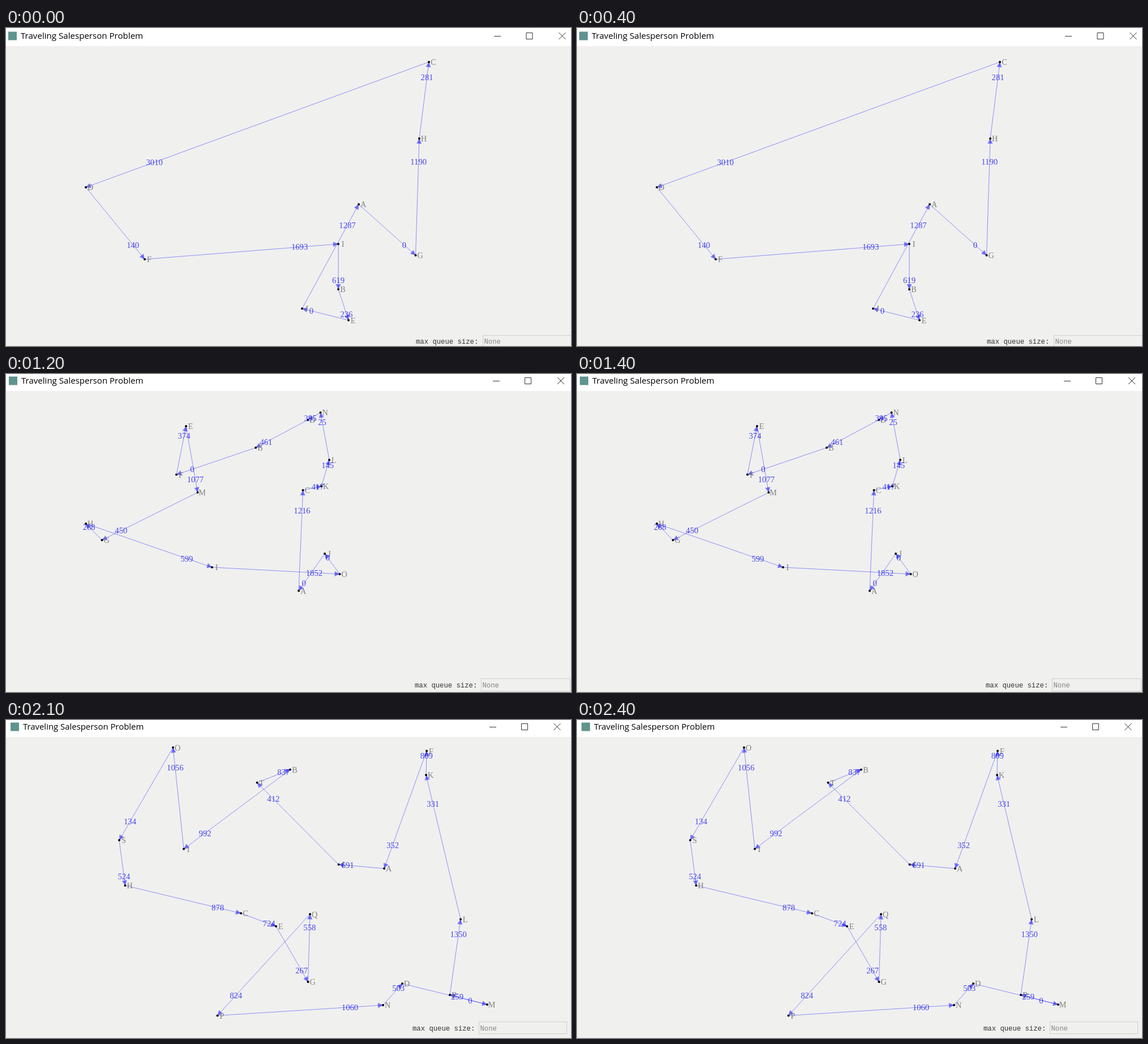
Animation of 998 by 561 pixels, one loop 3.1 s. Source, as an HTML page:

```html
<!DOCTYPE html>
<html lang="en">
<head>
<meta charset="utf-8">
<title>Traveling Salesperson Problem</title>
<style>
  html, body { margin: 0; width: 100%; height: 100%; overflow: hidden; background: #f0f0ef; }
  #stage { position: relative; width: 998px; height: 561px; overflow: hidden; }
  #strip { animation: scenes 3100ms step-end infinite; }
  svg { display: block; }
  .title { font: 15px "Open Sans", "Noto Sans", sans-serif; fill: #000; }
  .mono { font: 12.25px "Liberation Mono", monospace; }
  .cost { font: 14.7px "Liberation Serif", serif; fill: #00e; fill-opacity: .7; text-anchor: middle; }
  .name { font: 14.2px "Liberation Serif", serif; fill: #808080; text-anchor: middle; }
  .edge { stroke: #00f; stroke-opacity: .41; stroke-width: 1; }
  .head { fill: #00f; fill-opacity: .5; }
  .ctrl { fill: none; stroke: #333; stroke-width: 1; }
  /* cuts at 1000 ms and 2100 ms */
  @keyframes scenes {
    0% { transform: translateY(0); }
    32.258% { transform: translateY(-561px); }
    67.742%, 100% { transform: translateY(-1122px); }
  }
</style>
</head>
<body>
<div id="stage"><div id="strip"></div></div>
<script>
// Each stop: name, x, y, cost of the edge that arrives there.
const scenes = [
  {
    bar: 32, mid: 14, icon: 4, title: [26, 15.1], buttons: [868, 924.5, 982.5],
    label: [724, 557], box: [842.5, 542.5, 160, 23],
    tour: `C 747 60 281, D 141 281 3010, F 245 408 140, I 587 381 1693, B 587 461 619,
      E 605 515.5 236, J 523 495 0, A 623 311 1287, G 723.5 401 0, H 730 195 1190`
  },
  {
    bar: 30, mid: 12, icon: 5, title: [27, 15.05], buttons: [866, 922, 980],
    label: [722, 553], box: [839.5, 537.5, 157, 22],
    tour: `E 318 92 374, M 338.5 209 1077, G 169.5 293 450, H 141 264 268, I 364 341 599,
      O 589.5 353 1852, J 563 317 0, A 517 382.5 0, C 524.5 205 1216, K 557 198 417,
      L 571 151.5 145, N 555.5 68 25, D 533 81 395, B 441 130 461, F 301 177.5 0`
  },
  {
    bar: 30, mid: 12, icon: 8, title: [30, 14.9], buttons: [860, 916, 973.5],
    label: [718, 548], box: [835.5, 532.5, 155, 21],
    tour: `O 295 48.5 1056, S 200 212 134, H 210.5 292 524, C 415 341 878, E 477 364 724,
      G 533.5 462 267, Q 537 342.5 558, P 373.5 521.5 824, N 666 503 1060, D 700 465 503,
      M 850 502 0, R 784 485 259, L 803 351.5 1350, K 742 97 331, F 743 54.5 809,
      A 668 262 352, J 587.5 255 691, T 443.5 110.5 412, B 502 87.5 837, I 314 227.5 992`
  }
];

const text = (cls, x, y, str, extra = "") =>
  `<text class="${cls}" x="${x}" y="${y}" ${extra}>${str}</text>`;

function drawEdge(a, b) {
  const angle = Math.atan2(b.y - a.y, b.x - a.x) * 180 / Math.PI;
  return `<line class="edge" x1="${a.x}" y1="${a.y}" x2="${b.x}" y2="${b.y}"/>
    <path class="head" d="M0 0L-9 -4.5V4.5Z" transform="translate(${b.x} ${b.y}) rotate(${angle})"/>`;
}

function drawTour(str) {
  const stops = str.split(",").map(s => {
    const [name, x, y, cost] = s.trim().split(" ");
    return { name, x: +x, y: +y, cost };
  });
  const edges = stops.map((b, i) => [stops.at(i - 1), b]);
  return edges.map(([a, b]) => drawEdge(a, b)).join("") +
    stops.map(s => text("name", s.x + 8, s.y + 5, s.name) +
      `<circle cx="${s.x}" cy="${s.y}" r="2"/>`).join("") +
    edges.map(([a, b]) => text("cost", a.x + (b.x - a.x) * .8,
      a.y + (b.y - a.y) * .8 + 5, b.cost)).join("");
}

function drawWindow({ bar, mid, icon, title, buttons, label, box }) {
  const [min, max, close] = buttons;
  const [x, y, w, h] = box;
  return `<rect width="998" height="561" fill="#f0f0ef"/>
    <rect width="998" height="${bar}" fill="#fff"/>
    <rect x="${icon}" y="${mid - 7.5}" width="15" height="15" fill="#5f958e"/>
    ${text("title", title[0], mid + 5, "Traveling Salesperson Problem", `style="font-size:${title[1]}px"`)}
    <path class="ctrl" d="M${min - 6} ${mid + .5}h12M${max - 5.5} ${mid - 5.5}h11v11h-11z
      M${close - 6} ${mid - 6}l12 12m0 -12l-12 12"/>
    ${text("mono", label[0], label[1], "max queue size:", 'fill="#333"')}
    <rect x="${x}" y="${y}" width="${w}" height="${h}" fill="#f0f0ef" stroke="#cfcfcf"/>
    ${text("mono", x + 2, label[1], "None", 'fill="#858585"')}`;
}

document.getElementById("strip").innerHTML = scenes.map(s =>
  `<svg width="998" height="561" viewBox="0 0 998 561">${drawWindow(s)}${drawTour(s.tour)}</svg>`
).join("");
</script>
</body>
</html>
```
